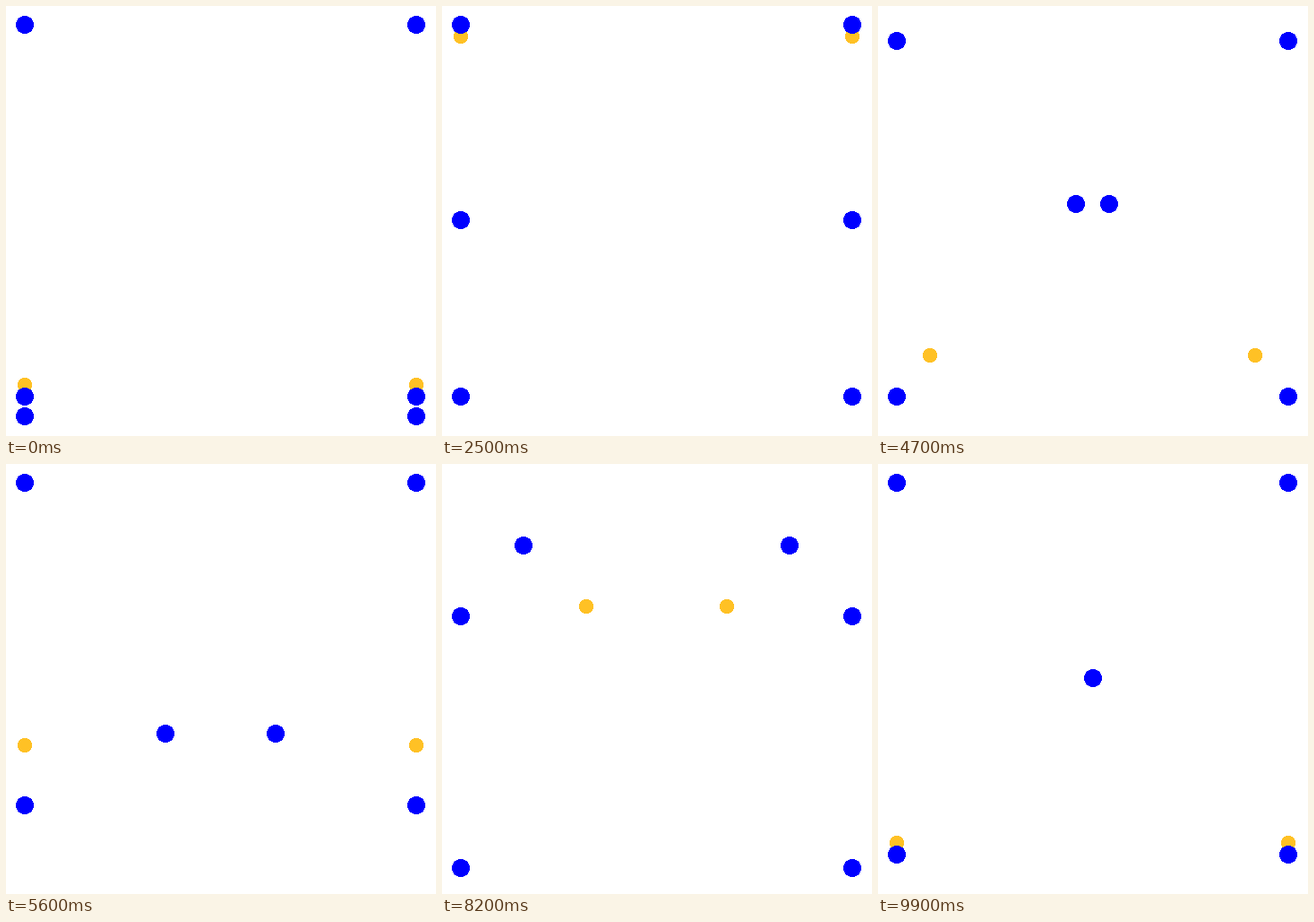
Write an HTML page with a canvas that moves like this. It is 480 px wide and 480 px high and loops after 10000 ms.

```html
<!DOCTYPE html>
<html lang="en">
<head>
<meta charset="utf-8">
<title>Passing drill</title>
<style>
  html, body { margin: 0; width: 100%; height: 100%; overflow: hidden; background: #fff; }
  canvas { display: block; width: 480px; height: 480px; }
</style>
</head>
<body>
<canvas id="stage" width="480" height="480"></canvas>
<script>
const ctx = document.getElementById('stage').getContext('2d');
const SIZE = 480, STEP = 100, STEPS = 100;
const MARGIN = SIZE / 22, SPAN = SIZE - 2 * MARGIN;
const EPS = 1e-6;

// Steps at which every dot reaches its next waypoint
const KEYS = [0, 25, 49, 74, 99];

// Waypoints in unit coordinates, y down; each path is also mirrored left to right
const BALL = [[0, .92], [0, .03], [1, .92], [1, .03], [0, .92]];
const PLAYERS = [
  [[0, 0], [0, 0], [.5, .5], [0, 1], [0, .95]],
  [[0, .95], [0, .5], [0, 0], [0, 0], [.5, .5]],
  [[0, 1], [0, .95], [0, .95], [0, .5], [0, 0]]
];

// Hard-edged disc, one row at a time
function disc(cx, cy, r) {
  for (let row = -r; row < r; row++) {
    const half = Math.round(Math.sqrt(r * r - (row + .5) ** 2));
    ctx.fillRect(cx - half, cy + row, 2 * half, 1);
  }
}

function drawPair(path, step, r, color) {
  let k = 0;
  while (k < KEYS.length - 2 && step >= KEYS[k + 1]) k++;
  const f = (step - KEYS[k]) / (KEYS[k + 1] - KEYS[k]);
  const at = axis => MARGIN + SPAN * (path[k][axis] + f * (path[k + 1][axis] - path[k][axis]));
  const x = at(0), y = Math.floor(at(1) - EPS);
  ctx.fillStyle = color;
  disc(Math.floor(x + EPS), y, r);
  disc(Math.floor(SIZE - x + EPS), y, r);
}

function draw(step) {
  ctx.fillStyle = '#fff';
  ctx.fillRect(0, 0, SIZE, SIZE);
  drawPair(BALL, step, 8, '#ffc125');
  for (const path of PLAYERS) drawPair(path, step, 10, '#00f');
}

let start = null;
function tick(now) {
  if (start === null) start = now;
  draw(Math.floor((now - start) / STEP) % STEPS);
  requestAnimationFrame(tick);
}

draw(0);
requestAnimationFrame(tick);
</script>
</body>
</html>
```
